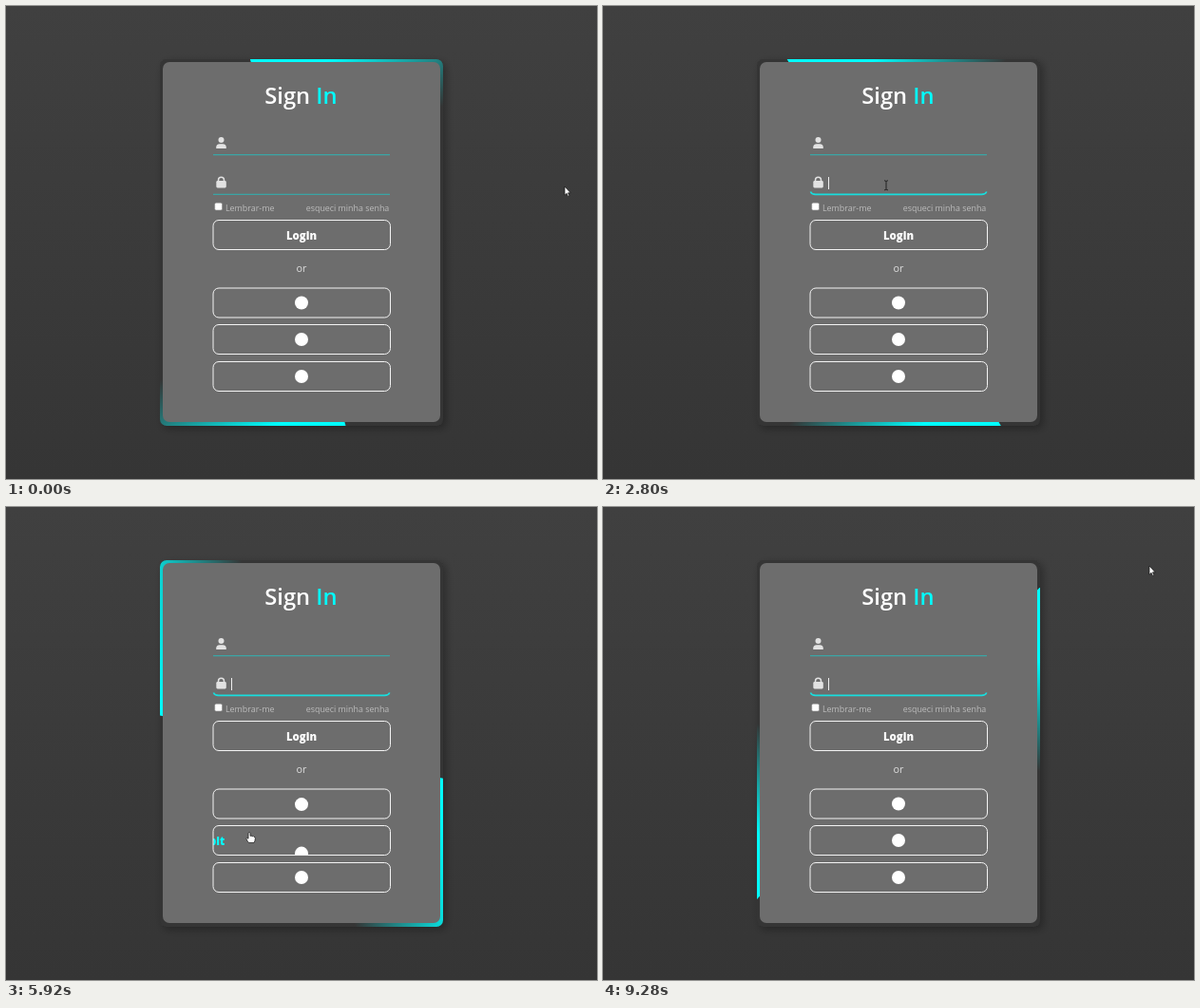
Recreate the animation shown at these times as an HTML page. Size 622x498 px, loop 9360 ms.

```html
<!DOCTYPE html>
<html lang="pt">
<head>
<meta charset="utf-8">
<title>Sign In</title>
<style>
  html, body { margin: 0; width: 100%; height: 100%; overflow: hidden; background: #3a3a3a; }
  svg { display: block; width: 622px; height: 498px; font-family: "Open Sans", "Noto Sans", sans-serif; }
  .frame { fill: none; stroke: #f4f4f4; }
  .bold { font-weight: 800; font-size: 11.4px; text-anchor: middle; }
  .small { font-size: 8.9px; fill: #bcbcbc; }
  .line { fill: none; stroke: #3aa5a5; stroke-width: 1.3; }
  .icon { fill: #e2e2e2; }
</style>
</head>
<body>
<svg viewBox="0 0 622 498">
  <defs>
    <linearGradient id="page" x2="0" y2="1">
      <stop stop-color="#404040"/><stop offset="1" stop-color="#353535"/>
    </linearGradient>
    <linearGradient id="glow" gradientUnits="userSpaceOnUse" x1="-10.3" y1="-25.9" x2="-51.7" y2="-129.3">
      <stop stop-color="aqua" stop-opacity="0"/><stop offset="1" stop-color="aqua"/>
    </linearGradient>
    <clipPath id="box"><rect x="162" y="56" width="298" height="386" rx="7"/></clipPath>
    <filter id="shadow" x="-10%" y="-10%" width="125%" height="125%">
      <feDropShadow dx="3" dy="3" stdDeviation="4" flood-color="#000" flood-opacity=".3"/>
    </filter>
  </defs>

  <rect width="622" height="498" fill="url(#page)"/>
  <rect x="162" y="56" width="298" height="386" rx="7" fill="#343434" filter="url(#shadow)"/>
  <g clip-path="url(#box)">
    <g id="spinner">
      <rect y="-300" width="300" height="300" fill="url(#glow)"/>
      <rect y="-300" width="300" height="300" fill="url(#glow)" transform="rotate(180)"/>
    </g>
  </g>
  <rect x="165" y="59" width="292" height="379" rx="7" fill="#6d6d6d"/>

  <text x="272.3" y="103" font-size="23.7" font-weight="600" fill="#fff">Sign <tspan fill="aqua">In</tspan></text>

  <g class="icon">
    <circle cx="226.5" cy="141" r="3"/>
    <path d="M221.2 150v-1q0-3.7 3.7-3.7h3.2q3.7 0 3.7 3.7v1z"/>
    <rect x="221.3" y="184" width="10.5" height="7.5" rx="1.4"/>
    <path d="M223.5 185v-1.7a3 3 0 0 1 6 0v1.7" fill="none" stroke="#e2e2e2" stroke-width="1.5"/>
  </g>
  <path class="line" d="M218 156.7H404"/>
  <path class="line" id="passwordLine" d="M218 198.3H404"/>
  <path id="focusLine" d="M218.4 195.5Q219.5 198.4 223.5 198.4H398.5Q402.5 198.4 403.8 195.5" fill="none" stroke="#18dede" stroke-width="1.6"/>
  <path id="caret" d="M237.5 180v13" stroke="#eee"/>

  <rect x="219.7" y="207.2" width="7.8" height="7.8" rx="1.5" fill="#fff" stroke="#888" stroke-width=".6"/>
  <text class="small" x="231" y="215.8">Lembrar-me</text>
  <text class="small" x="403.3" y="215.8" text-anchor="end">esqueci minha senha</text>

  <rect class="frame" x="218" y="225.5" width="186.5" height="31" rx="6"/>
  <text class="bold" x="311" y="246" fill="#fff">Login</text>
  <text x="311" y="280" font-size="10.8" fill="#ddd" text-anchor="middle">or</text>
  <g id="providers"></g>

  <g id="cursor">
    <path id="arrow" d="M0 0V9.2L2.1 7.3 3.5 10.4 4.9 9.8 3.5 6.8H6.2Z" fill="#fff" stroke="#111" stroke-width=".7"/>
    <path id="hand" d="M-1 1Q0-.6 1 1V4.2Q2.3 3.5 3 4.6 4.5 4 5 5.2 6.4 5 6.3 6.6 6.3 9 5 11.3H-.6Q-2.2 9.3-3.3 6.8-3.3 5.3-1 7Z" fill="#fff" stroke="#111" stroke-width=".7"/>
    <path id="beam" d="M-2-5Q0-5 0-4 0-5 2-5M0-4V4M-2 5Q0 5 0 4 0 5 2 5" fill="none" stroke="#111" stroke-width=".8"/>
  </g>
</svg>
<script>
const LOOP = 9360, STEP = 80, FOCUS_TIME = 2450, BLINK = 1060;
const $ = id => document.getElementById(id);
const show = (id, visible) => $(id).setAttribute('visibility', visible ? 'visible' : 'hidden');
const clamp = x => Math.min(1, Math.max(0, x));

// [time, angle]
const spin = [[0, -14.6], [1920, -146.7], [3680, -273.8], [4960, -369.6], [6880, -505.3], [8320, -607.1], [9280, -677.8]];

// [time, x, y]
const path = [
  [0, 588, 190], [1040, 588, 190], [1920, 408, 194], [2400, 330, 188], [2900, 290, 189],
  [3680, 223, 235], [4400, 232, 270], [4924, 239, 297], [4960, 239, 304.5],
  [5640, 250, 328], [5780, 254, 336], [6460, 264, 366], [6610, 268, 375], [6880, 271, 389.5],
  [7500, 300, 392], [7760, 404, 370], [8320, 574, 270], [8720, 574, 266], [9280, 575, 62]
];

const providers = [
  { y: 297, label: 'Zuvelo', enter: 4924, leave: 5640 },
  { y: 335.5, label: 'Norvabit', enter: 5780, leave: 6460 },
  { y: 374.5, label: 'T-Fidol', enter: 6610, leave: 7700 }
];

$('providers').innerHTML = providers.map(({ y, label }, i) => `
  <clipPath id="clip${i}"><rect x="218" y="${y}" width="186.5" height="31" rx="6"/></clipPath>
  <g clip-path="url(#clip${i})">
    <circle id="mark${i}" cx="311" cy="${y + 15.5}" r="7" fill="#fff"/>
    <text id="label${i}" class="bold" x="311" y="${y + 20}" fill="aqua">${label}</text>
  </g>
  <rect class="frame" x="218" y="${y}" width="186.5" height="31" rx="6"/>`).join('');

function sample(keys, t) {
  const next = keys.findIndex(key => key[0] > t);
  if (next < 0) return keys[keys.length - 1].slice(1);
  const a = keys[next - 1], b = keys[next];
  const k = (t - a[0]) / (b[0] - a[0]);
  return a.slice(1).map((v, i) => v + (b[i + 1] - v) * k);
}

const ease = x => 1 - (1 - x ** 1.4) ** 3;

function hoverAmount({ enter, leave }, t) {
  return t < leave ? ease(clamp((t - enter) / 500)) : 1 - ease(clamp((t - leave) / 350));
}

function drawCursor(t) {
  const [x, y] = sample(path, t);
  const inColumn = x > 218 && x < 404;
  const overButton = inColumn && [225.5, ...providers.map(p => p.y)].some(top => y >= top && y <= top + 31);
  const overInput = inColumn && y > 176 && y < 199;
  $('cursor').setAttribute('transform', `translate(${x} ${y})`);
  show('hand', overButton);
  show('beam', overInput);
  show('arrow', !overButton && !overInput);
}

function draw(now) {
  const t = Math.floor(now % LOOP / STEP) * STEP;
  $('spinner').setAttribute('transform', `translate(308 252) rotate(${sample(spin, t)[0]})`);

  const focused = t >= FOCUS_TIME;
  show('passwordLine', !focused);
  show('focusLine', focused);
  show('caret', focused && (t - FOCUS_TIME) % BLINK < BLINK / 2);

  providers.forEach((provider, i) => {
    const amount = hoverAmount(provider, t);
    $('mark' + i).setAttribute('transform', `translate(0 ${32 * amount})`);
    $('label' + i).setAttribute('transform', `translate(${-186 * (1 - amount)} 0)`);
  });
  drawCursor(t);
}

const start = performance.now();
function tick() {
  draw(performance.now() - start);
  requestAnimationFrame(tick);
}
tick();
</script>
</body>
</html>
```
